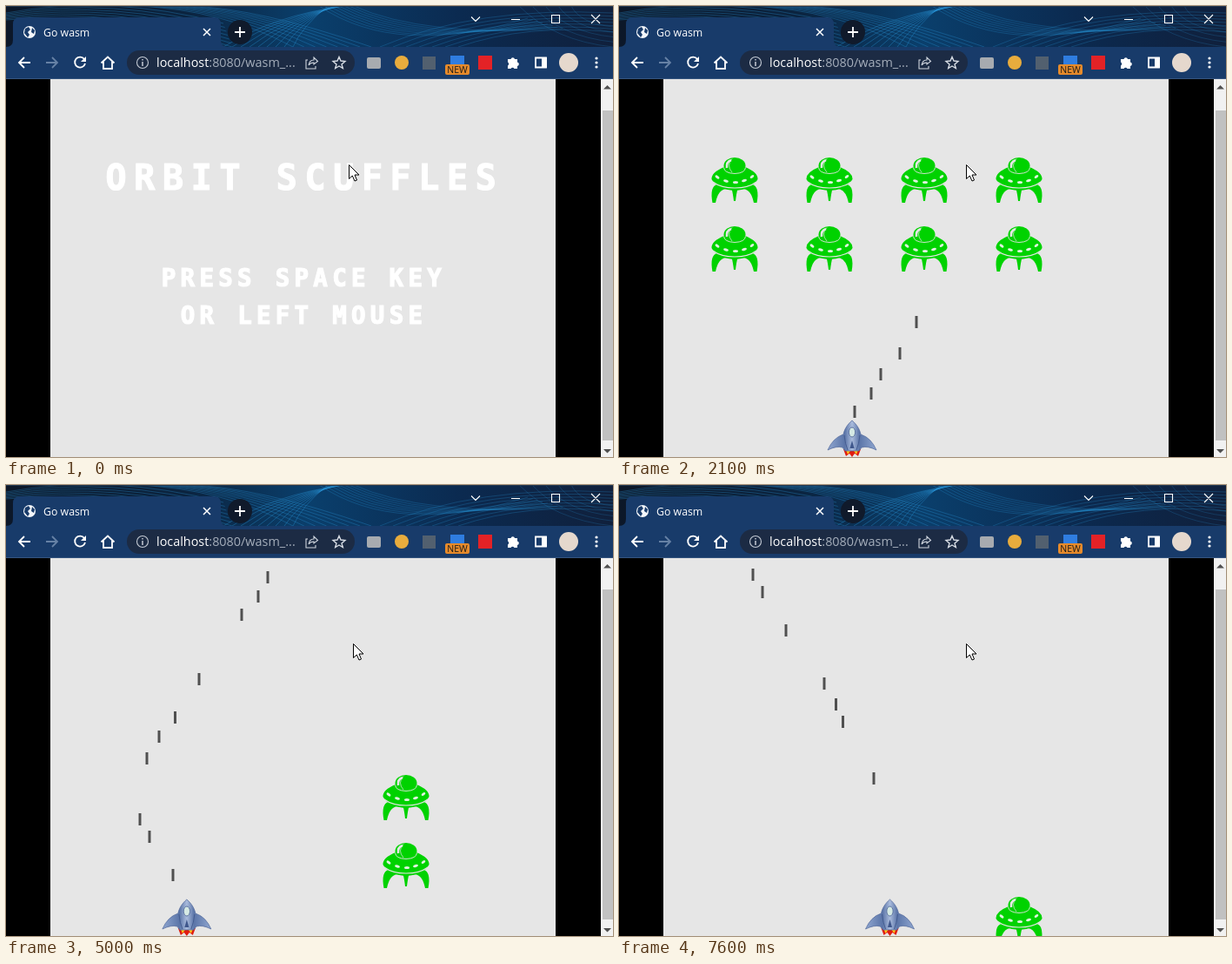
Write an HTML page that moves like this. It is 698 by 518 pixels and loops after 7700 ms.

```html
<!DOCTYPE html>
<html lang="en">
<head>
<meta charset="utf-8">
<title>Go wasm</title>
<style>
html, body { margin: 0; width: 100%; height: 100%; overflow: hidden; background: #000; }
svg { display: block; }
.ui { font-family: "Open Sans", "Noto Sans", sans-serif; }
.arcade { font-family: "DejaVu Sans Mono", monospace; font-weight: bold; fill: #fff; stroke: #fff; stroke-width: 1.2; white-space: pre; }
.line { fill: none; stroke: #fff; stroke-width: 1.8; }
.thin { fill: none; stroke: #fff; stroke-width: 1.1; }
</style>
</head>
<body>
<svg width="698" height="518" viewBox="0 0 698 518">
  <defs>
    <linearGradient id="sky">
      <stop offset="0" stop-color="#0c1728"/><stop offset=".3" stop-color="#0b2440"/>
      <stop offset=".5" stop-color="#0a3f6c"/><stop offset=".75" stop-color="#0b2a50"/>
      <stop offset="1" stop-color="#10203c"/>
    </linearGradient>
    <linearGradient id="hull">
      <stop offset="0" stop-color="#8fa6d0"/><stop offset=".35" stop-color="#5b75a8"/>
      <stop offset=".5" stop-color="#a9bbdc"/><stop offset=".65" stop-color="#5b75a8"/>
      <stop offset="1" stop-color="#8fa6d0"/>
    </linearGradient>
    <g id="alien">
      <g fill="#00d200">
        <path d="M15 11Q27 4 39 11Q54 17 53.5 25Q47 37 27 38Q7 37 .5 25Q0 17 15 11Z"/>
        <path id="leg" d="M1.500 52Q-2 33 7 31L17 36Q8 37 5 52Z"/>
        <use href="#leg" transform="translate(54) scale(-1 1)"/>
        <path d="M23.500 36H30.500Q29 41 28 50H26Q25 41 23.500 36Z"/>
        <ellipse cx="27" cy="9.500" rx="12.500" ry="9.500"/>
      </g>
      <g fill="none" stroke="#e6e6e6">
        <path d="M14.500 11.500Q15 18 27 18.500Q39 18 39.500 11.500" stroke-width=".9"/>
        <path d="M2 28Q11 35 27 35T52 28" stroke-width="1.100"/>
        <path d="M18 12Q17 5 23 3" stroke-width="2.600"/>
        <path d="M24 1.500Q17 9 24 17" stroke-width=".7"/>
      </g>
      <g fill="#e0f2e0">
        <ellipse cx="7" cy="22.500" rx="2.800" ry="1.500" transform="rotate(35 7 22.500)"/>
        <ellipse cx="17" cy="27" rx="3" ry="1.600" transform="rotate(14 17 27)"/>
        <ellipse cx="28" cy="28.500" rx="3" ry="1.500"/>
        <ellipse cx="38" cy="26.500" rx="3" ry="1.600" transform="rotate(-14 38 26.500)"/>
        <ellipse cx="47" cy="22" rx="2.600" ry="1.500" transform="rotate(-35 47 22)"/>
      </g>
    </g>
    <g id="ship">
      <path d="M-10 33L-7 41L-3 38L0 42L3 38L7 41L10 33Z" fill="#e01c10"/>
      <path d="M-7 34L-5 39L-2 35H2L5 39L7 34Z" fill="#ffc61a"/>
      <path d="M0 0C6 5 9 11 10 16Q22 20 28 34Q18 29 11 31L8 35H-8L-11 31Q-18 29-28 34Q-22 20-10 16C-9 11-6 5 0 0Z" fill="url(#hull)" stroke="#52699b" stroke-width=".7"/>
      <path d="M-9 17Q-8 27-5 34M9 17Q8 27 5 34" fill="none" stroke="#445c90"/>
      <path d="M-2.500 32L0 23L2.500 32Z" fill="#3f578c"/>
      <ellipse cy="13.500" rx="3.600" ry="5.500" fill="#d5e9e4" stroke="#445c90" stroke-width=".8"/>
    </g>
  </defs>

  <rect width="698" height="48" fill="url(#sky)"/>
  <g id="waves" fill="none" stroke="#2b9be0"></g>
  <path d="M0 .5H698" stroke="#22364e"/>

  <!-- tab strip -->
  <path d="M0 47Q8 47 8 39V21Q8 13 16 13H239Q247 13 247 21V39Q247 47 255 47Z" fill="#183b6a"/>
  <circle cx="27" cy="30" r="7" fill="#f4f7fb"/>
  <path d="M22 26L26 24L28 27L25 30L27 33L25 36L21 31ZM30 25L33 28L32 32L29 30Z" fill="#183b6a"/>
  <text class="ui" x="43" y="35" font-size="12.3" fill="#fff">Go wasm</text>
  <path class="thin" d="M227 26L235 34M235 26L227 34" style="stroke-width:1.5"/>
  <circle cx="269" cy="30" r="14" fill="#101a2b"/>
  <path class="line" d="M263 30H275M269 24V36"/>
  <path class="thin" d="M535 12.500L540 17.500L545 12.500M581 15.500H591M627.500 10.500H636.500V19.500H627.500ZM673 10L683 20M683 10L673 20"/>

  <!-- toolbar -->
  <rect y="47" width="698" height="37" fill="#183b6a"/>
  <path d="M0 83.500H698" stroke="#35557f"/>
  <path class="line" d="M28 65H15M21 59L15 65L21 71"/>
  <path class="line" d="M46 65H59M53 59L59 65L53 71" style="stroke:#6681a5"/>
  <path class="line" d="M90 61A6 6 0 1 0 91 66"/>
  <path d="M92 58V64H86Z" fill="#fff"/>
  <path class="line" d="M109.500 65.500L117 58.500L124.500 65.500M112 64V72H122V64"/>
  <rect x="139" y="51" width="262" height="28" rx="14" fill="#1c2b44"/>
  <circle class="thin" cx="157" cy="65" r="6.500" style="stroke:#c3cad4"/>
  <path d="M157 64V69M157 61V62.500" stroke="#c3cad4" stroke-width="1.500"/>
  <text class="ui" x="173" y="70" font-size="14.4" fill="#a5aebb"><tspan fill="#fff">localhost</tspan>:8080/wasm_...</text>
  <path class="thin" d="M347 62H345V72H356V69M348 68Q349 62 354 62V59L358.500 63.500L354 67V65Q350 65 348 68Z" style="stroke:#cfd5de"/>
  <path class="thin" d="M383 58.500L385 63L390 63.500L386 67L387.300 71.500L383 69L378.700 71.500L380 67L376 63.500L381 63Z" style="stroke:#d7dce4;stroke-width:1.400"/>
  <rect x="415" y="59" width="16" height="13" rx="2" fill="#a7abb0"/>
  <circle cx="455" cy="65" r="8" fill="#e8ac3d"/>
  <rect x="479" y="58" width="15" height="15" fill="#52606f"/>
  <rect x="511" y="57" width="16" height="14" fill="#2f7de0"/>
  <rect x="505" y="67" width="28" height="12" rx="2" fill="#e58a2b"/>
  <text class="ui" x="519" y="77" font-size="10.5" text-anchor="middle" fill="#1b1b1b">NEW</text>
  <rect x="543" y="57" width="16" height="16" fill="#e32226"/>
  <path d="M577 61H580.500A2.300 2.300 0 0 1 585 61H588V64.500A2.300 2.300 0 0 1 588 69V72H584.500A2.300 2.300 0 0 0 580.500 72H577V68.500A2.300 2.300 0 0 0 577 64.500Z" fill="#fff"/>
  <path class="line" d="M609 59.500H621V70.500H609Z"/>
  <path d="M616 59H622V71H616Z" fill="#fff"/>
  <circle cx="647" cy="65" r="11" fill="#e5d8cd"/>
  <g fill="#fff"><circle cx="679" cy="60" r="1.600"/><circle cx="679" cy="65" r="1.600"/><circle cx="679" cy="70" r="1.600"/></g>

  <!-- page -->
  <rect y="84" width="698" height="434"/>
  <rect x="51" y="84" width="581" height="434" fill="#e6e6e6"/>
  <svg x="51" y="84" width="581" height="434" viewBox="51 84 581 434">
    <g id="intro">
      <text class="arcade" x="114.600" y="211" font-size="40" letter-spacing="8.62">ORBIT SCUFFLES</text>
      <text class="arcade" x="178.800" y="321.500" font-size="27.5" letter-spacing="5.26">PRESS SPACE KEY</text>
      <text class="arcade" x="200.700" y="365" font-size="27.5" letter-spacing="5.26">OR LEFT MOUSE</text>
    </g>
    <g id="game"></g>
  </svg>
  <rect x="684" y="84" width="14" height="434" fill="#f1f1f1"/>
  <rect x="686" y="120" width="12" height="379" fill="#c1c1c1"/>
  <path d="M687 95.500L691.500 91L696 95.500ZM687 509L691.500 513.500L696 509Z" fill="#505050"/>
  <path id="cursor" d="M.5 .5V16.500L4.300 13L7 19L9.500 18L7 12H12Z" fill="#fff" stroke="#000"/>
</svg>
<script>
const LOOP = 7700, STEP = 100, START = 500, FIRE_Y = 463;
const $ = id => document.getElementById(id);

function add(parent, tag, attrs) {
  const el = document.createElementNS('http://www.w3.org/2000/svg', tag);
  for (const k in attrs) el.setAttribute(k, attrs[k]);
  parent.append(el);
  return el;
}

// piecewise linear curve through [input, output] points
function track(points, v) {
  const i = points.findIndex(p => p[0] > v);
  if (i < 0) return points[points.length - 1][1];
  if (!i) return points[0][1];
  const [a, b] = points[i - 1], [c, d] = points[i];
  return b + (d - b) * (v - a) / (c - a);
}

// a fan of curves blending from one quadratic to another
function fan(from, to, count, opacity) {
  for (let i = 0; i < count; i++) {
    const p = from.map((v, k) => v + (to[k] - v) * i / (count - 1));
    add($('waves'), 'path', { d: `M${p[0]} ${p[1]}Q${p.slice(2)}`, opacity });
  }
}
fan([0, 8, 120, -14, 250, 20], [0, 16, 130, 4, 260, 47], 7, .3);
fan([150, 0, 250, 4, 330, 47], [210, 0, 290, 2, 420, 47], 8, .3);
fan([250, 47, 310, 10, 390, 0], [330, 47, 340, 24, 370, 0], 9, .35);
fan([360, 0, 450, 60, 600, 14], [400, 0, 480, 36, 640, 26], 8, .25);
fan([430, 47, 540, 0, 698, 8], [520, 47, 600, 20, 698, 30], 7, .25);
fan([590, 0, 630, 40, 698, 47], [650, 0, 660, 20, 698, 24], 5, .2);

// height of the fleet over time; everything else runs on this clock
const fleet = [[440, 81], [800, 101], [1600, 145], [2100, 174], [2400, 188], [3200, 231],
  [4100, 284.5], [4800, 322], [6000, 385], [7600, 473], [7700, 478.5]];

// shots: fleet height when fired, x, then column and row of the alien hit
const shots = [[120.5, 342, 2, 1], [138.5, 323, 2, 0], [150.5, 301], [161.5, 290], [172, 271],
  [184.5, 260, 1, 1], [196.5, 238, 1, 0], [209, 222], [231, 194.5], [242, 176], [254.5, 162],
  [264.5, 149, 0, 1], [274.5, 146, 0, 0], [289.5, 154], [299.5, 165], [321.5, 192],
  [352, 236], [364, 249.5], [374, 257.5], [406.5, 293]];

const shipPath = [...shots, [174, 268], [284.5, 145.5], [385, 268], [421, 311.5]]
  .sort((a, b) => a[0] - b[0]);

// fleet height at which a shot rising at double speed meets its alien
const hitAt = ([fired, , , row]) => (FIRE_Y - 52 - 78.7 * row + 2 * fired) / 3;

const aliens = [];
for (let i = 0; i < 8; i++) {
  const col = i % 4, row = i >> 2;
  const killer = shots.find(s => s[2] === col && s[3] === row);
  aliens.push({ x: 106 + 109 * col, dy: 78.7 * row, end: killer ? hitAt(killer) : Infinity,
    el: add($('game'), 'use', { href: '#alien' }) });
}
const bullets = shots.map(s => ({ fired: s[0], end: s.length > 2 ? hitAt(s) : Infinity,
  el: add($('game'), 'rect', { x: s[1] - 1.5, width: 3, height: 14, fill: '#505050' }) }));
const ship = add($('game'), 'use', { href: '#ship', y: 476 });

const show = (el, on) => el.setAttribute('visibility', on ? 'visible' : 'hidden');

function draw() {
  const t = Math.floor(performance.now() % LOOP / STEP) * STEP;
  const playing = t >= START, h = track(fleet, t);
  $('intro').style.display = playing ? 'none' : '';
  $('game').style.display = playing ? '' : 'none';
  $('cursor').setAttribute('transform', `translate(${t < 300 ? 394 : 399} 182)`);
  for (const a of aliens) {
    a.el.setAttribute('transform', `translate(${a.x} ${Math.round(h + a.dy)})`);
    show(a.el, h < a.end);
  }
  for (const b of bullets) {
    b.el.setAttribute('y', Math.round(FIRE_Y - 2 * (h - b.fired)));
    show(b.el, h >= b.fired && h < b.end);
  }
  ship.setAttribute('x', track(shipPath, h));
  requestAnimationFrame(draw);
}
draw();
</script>
</body>
</html>
```
